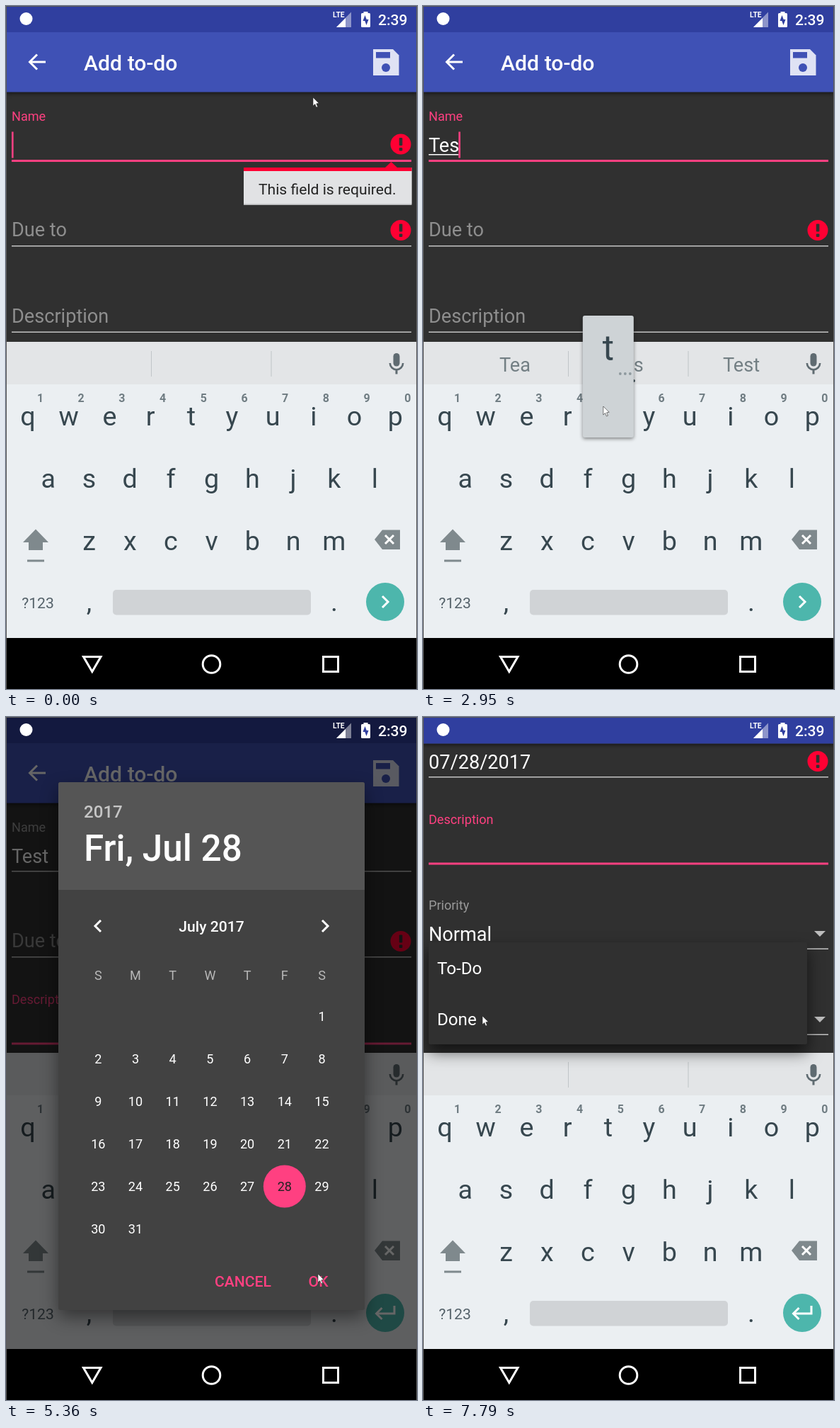
Write an HTML page with a canvas that moves like this. It is 581 by 964 pixels and loops after 8 s.

```html
<!DOCTYPE html>
<html>
<head>
<meta charset="utf-8">
<title>Add to-do</title>
<style>
html, body { margin: 0; width: 100%; height: 100%; overflow: hidden; background: #000; }
canvas { display: block; }
</style>
</head>
<body>
<canvas id="stage" width="581" height="964"></canvas>
<script>
const c = document.getElementById('stage').getContext('2d');
const LOOP = 8000, HOLD = 150, SP = 1.508;
const PINK = '#ff4081', RED = '#ff0033', DARK = '#303030', BLUE = '#3f51b5', NAVY = '#303f9f';
const TEAL = '#4db6ac', INK = '#37474f', GRAY = '#7f898d', HINT = '#8e8e8e', LABEL = '#9a9a9a';

const ROWS = ['qwertyuiop', 'asdfghjkl', 'zxcvbnm'];
const INDENT = [0, .5, 1.5];
const TAPS = [
  { key: 'T', at: 1750, words: ['The', 'T', 'This'] },
  { key: 'e', at: 2280, words: ['Tea', 'Te', 'Ten'] },
  { key: 's', at: 2580, words: ['Tea', 'Tes', 'Test'] },
  { key: 't', at: 2920, words: ['Tests', 'Test', 'Testing'] }
];
const SHIFT = 1200, NEXT = 3500, OPEN = 4130, CLOSE = 5500, SCROLL = 5810, DROP = 7340;

const keyPos = (r, i) => [31 + 57.7 * (i + INDENT[r]), 578 + 88 * r];
function findKey(key) {
  const k = key.toLowerCase(), r = ROWS.findIndex(row => row.includes(k));
  return keyPos(r, ROWS[r].indexOf(k));
}
// The pointer reaches each stop at its time and rests there for HOLD
const STOPS = [
  [0, 434, 129], [1130, 44, 750], [1450, 97, 706],
  ...TAPS.map(({ key, at }) => {
    const [x, y] = findKey(key);
    return [at, x - 7, y - 13];
  }),
  [3400, 534, 835], [3880, 151, 321], [4280, 151, 321], [5360, 441, 786],
  [5660, 235, 389], [6330, 235, 150], [7210, 100, 424], [7700, 84, 422]
];

const ramp = (t, a, b) => Math.max(0, Math.min(1, (t - a) / (b - a)));

function box(x, y, w, h, color, r = 0) {
  c.fillStyle = color;
  c.beginPath();
  c.roundRect(x, y, w, h, r);
  c.fill();
}
function disc(x, y, r, color) {
  c.fillStyle = color;
  c.beginPath();
  c.arc(x, y, r, 0, 7);
  c.fill();
}
function trace(pts) {
  c.beginPath();
  for (let i = 0; i < pts.length; i += 2) c.lineTo(pts[i], pts[i + 1]);
}
function poly(color, ...pts) {
  c.fillStyle = color;
  trace(pts);
  c.fill();
}
function line(color, ...pts) {
  c.strokeStyle = color;
  c.lineWidth = 3;
  trace(pts);
  c.stroke();
}
// Isosceles triangle: centre x, base y, half width, height (negative points up)
const tri = (color, x, y, w, h) => poly(color, x - w, y, x + w, y, x, y + h);
// Angle bracket with its tip at x, y; dir 1 points right
const chevron = (x, y, dir, s = 8) => line('#fff', x - dir * s, y - s, x, y, x - dir * s, y + s);
const dots = (x, y, gap, color) => [-gap, 0, gap].forEach(d => disc(x + d, y, 1.9, color));

function text(s, x, y, sp, color, align = 'left', weight = 400) {
  c.font = `${weight} ${sp * SP}px Roboto, sans-serif`;
  c.textAlign = align;
  c.fillStyle = color;
  c.fillText(s, x, y);
  return c.measureText(s).width;
}
function shadowBox(blur, dy, alpha, ...args) {
  c.save();
  c.shadowColor = `rgba(0,0,0,${alpha})`;
  c.shadowBlur = blur;
  c.shadowOffsetY = dy;
  box(...args);
  c.restore();
}
function fade(alpha, draw) {
  if (alpha <= 0) return;
  c.globalAlpha = alpha;
  draw();
  c.globalAlpha = 1;
}

function alertIcon(y) {
  disc(558, y, 14.5, RED);
  box(555.8, y - 9, 4.6, 11, DARK, 1);
  box(555.8, y + 5, 4.6, 4.6, DARK, 1);
}
// A form row; y is its underline. An empty, unfocused row shows its label as hint.
function field(y, label, value, focused, caret) {
  if (value || focused) text(label, 8, y - 55.5, 12, focused ? PINK : LABEL);
  else text(label, 8, y - 13.5, 18, HINT);
  const w = text(value, 8, y - 11.5, 18, '#fff');
  if (value && focused) box(8, y - 8.5, w - 1, 1.5, '#fff');
  if (focused) box(8, y - .5, 565, 3, PINK);
  else box(8, y - .5, 565, 1.5, '#c4c4c4');
  if (focused && caret) box(8 + Math.max(0, w - 1), y - 40, 2.6, 37, PINK);
}
function spinner(y, label, value) {
  field(y, label, value);
  tri('#bdbdbd', 561, y - 25, 8, 8);
}

function form(t, typed, scroll) {
  const onName = t < NEXT;
  const typing = typed && onName;
  const visible = (t < OPEN || t > CLOSE) && t < DROP;
  const caret = visible && (typing || (t + 200) % 1000 < 500);
  c.save();
  c.beginPath();
  c.rect(0, 37, 581, 437);
  c.clip();
  box(0, 37, 581, 437, DARK);
  c.translate(0, -scroll);

  field(217.5, 'Name', typed, onName, caret);
  field(338.5, 'Due to', t < CLOSE ? '' : '07/28/2017');
  field(460, 'Description', '', !onName, caret);
  spinner(581, 'Priority', 'Normal');
  spinner(702, 'State', 'To-Do');
  alertIcon(316.5);
  if (!typed) {
    alertIcon(195);
    tri(RED, 544.5, 229, 9.5, -9);
    box(336, 233, 237.5, 48, '#b4b5b7');
    box(336, 228, 237.5, 51.5, '#e1e2e4');
    box(336, 228, 237.5, 5, RED);
    text('This field is required.', 357, 266, 14, '#222');
  }
  c.restore();
}

function toolbar(scroll) {
  c.save();
  c.translate(0, -Math.min(84, scroll));
  shadowBox(5, 2, .5, 0, 37, 581, 84.5, BLUE);
  chevron(33.5, 79, -1, 10.5);
  line('#fff', 34, 79, 56, 79);
  text('Add to-do', 110, 91, 20, '#fff', 'left', 500);
  poly('#dfe2f4', 519, 61, 547, 61, 555.5, 69.5, 555.5, 98, 519, 98);
  box(523, 65, 20, 8.5, BLUE);
  disc(537, 87, 6, BLUE);
  c.restore();
  box(0, 0, 581, 37, NAVY);
}

function statusIcons() {
  disc(28.5, 18, 9, '#fff');
  text('LTE', 462, 16, 6.8, '#fff', 'left', 700);
  poly('rgba(255,255,255,.45)', 467, 30, 488, 30, 488, 8.5);
  poly('#fff', 467, 30, 480, 30, 480, 17);
  box(502, 10, 13, 20, '#fff', 1.5);
  box(505.5, 8, 6, 3, '#fff');
  tri(NAVY, 507.5, 21, 3, -8);
  tri(NAVY, 509.5, 19, 3, 8);
  text('2:39', 526, 27, 14, '#fff', 'left', 500);
}

function mic() {
  box(547.5, 490, 9, 18.5, '#5f6b71', 4.5);
  c.strokeStyle = '#5f6b71';
  c.lineWidth = 2.6;
  c.beginPath();
  c.arc(552, 504, 9.2, 0, Math.PI);
  c.stroke();
  box(550.5, 513, 3, 6.5, '#5f6b71');
}

function keyboard(t, words) {
  const upper = t >= SHIFT && t < TAPS[0].at + HOLD;
  box(0, 474, 581, 60, '#e3e5e7');
  box(0, 534, 581, 358, '#ebeff2');
  for (const x of [205, 374.5]) box(x, 487, 1, 36, '#c0c5c8');
  mic();
  words.forEach((w, i) => text(w, 130 + 160 * i, 515.5, 18, '#737f84', 'center'));
  if (words.length) dots(290, 529, 8, INK);

  ROWS.forEach((row, r) => [...row].forEach((k, i) => {
    const [x, y] = keyPos(r, i);
    text(upper ? k.toUpperCase() : k, x, y + 13.5, 25, INK, 'center');
    if (r === 0) text((i + 1) % 10, x + 17.5, y - 19, 10.6, '#6f7c82', 'center', 700);
  }));

  const shift = upper ? TEAL : GRAY;
  tri(shift, 42, 757, 18, -18.5);
  box(32, 756, 20, 12, shift);
  box(30, 781.5, 24, 3, GRAY);
  poly(GRAY, 521, 753, 532, 739.5, 557, 739.5, 557, 767, 532, 767);
  line('#fff', 536, 747, 548, 759);
  line('#fff', 548, 747, 536, 759);

  text('?123', 45, 849.5, 14, '#55626a', 'center');
  text(',', 117.5, 854, 25, INK, 'center');
  text('.', 464, 854, 25, INK, 'center');
  box(151, 824, 280, 35.5, '#d0d3d6', 5);
  disc(536, 841, 27, TEAL);
  if (t < NEXT) chevron(540, 841, 1);
  else {
    chevron(523.5, 842, -1);
    line('#fff', 549, 831, 549, 842, 524, 842);
  }
}

function keyPopup({ key }) {
  const [x, y] = findKey(key);
  shadowBox(5, 2, .45, x - 36, y - 141, 72, 172, '#ced3d6', 3);
  text(key, x, y - 78, 33, INK, 'center');
  dots(x + 24, y - 59, 7, '#8e999e');
}

function navBar() {
  box(0, 892, 581, 72, '#000');
  line('#fff', 121.8, 918.5, 134, 918.5, 121.8, 939.5, 109.5, 918.5, 121.8, 918.5);
  c.beginPath();
  c.arc(290.5, 929, 12.3, 0, 7);
  c.stroke();
  c.strokeRect(448.5, 918.5, 21, 21);
}

function picker(t) {
  shadowBox(24, 10, .45, 74, 92, 433, 745, '#424242', 3);
  box(74, 92, 433, 152, '#555', [3, 3, 0, 0]);
  text('2017', 110, 142, 16, '#c6c6c6', 'left', 500);
  text('Fri, Jul 28', 110, 203, 34, '#fff', 'left', 500);
  text('CANCEL', 335, 804, 14, PINK, 'center', 500);
  text('OK', 441.5, 804, 14, PINK, 'center', 500);
  if (t < OPEN + 280) return;
  chevron(126, 295, -1);
  chevron(455, 295, 1);
  text('July 2017', 290.5, 303, 14, '#fff', 'center', 500);
  const colX = i => 130.3 + 52.7 * i;
  [...'SMTWTFS'].forEach((d, i) => text(d, colX(i), 371, 12, '#b8b8b8', 'center'));
  disc(colX(5), 662.5, 30, PINK);
  for (let d = 1; d <= 31; d++) {
    const n = d + 5;
    text(d, colX(n % 7), 428.5 + 60.1 * Math.floor(n / 7), 12, d === 28 ? '#222' : '#fff', 'center');
  }
}

function dropdown() {
  shadowBox(22, 11, .6, 8, 318, 535, 144, DARK, 2);
  text('To-Do', 20, 362.5, 16, '#fff');
  text('Done', 20, 435, 16, '#fff');
}

function pointer(t) {
  const i = STOPS.findLastIndex(s => s[0] <= t);
  const [a, ax, ay] = STOPS[i], [b, bx, by] = STOPS[i + 1] || [LOOP, ax, ay];
  const u = ramp(t, a + HOLD, b);
  c.save();
  c.translate(ax + (bx - ax) * u, ay + (by - ay) * u);
  poly('#fff', 0, 0, 0, 12, 2.8, 9.5, 4.6, 14, 6.6, 13.2, 4.8, 8.8, 8.3, 8.3);
  c.closePath();
  c.strokeStyle = 'rgba(40,40,40,.75)';
  c.lineWidth = .8;
  c.stroke();
  c.restore();
}

function render(t) {
  const done = TAPS.filter(k => k.at + HOLD <= t);
  const typed = done.map(k => k.key).join('');
  const words = typed && t < NEXT ? done.at(-1).words : [];
  const u = ramp(t, SCROLL, SCROLL + 520);
  const scroll = 254 * (1 - (1 - u) ** 2);
  const closing = 1 - ramp(t, CLOSE, CLOSE + 140);

  form(t, typed, scroll);
  toolbar(scroll);
  keyboard(t, words);
  TAPS.filter(k => k.key !== 's' && k.at <= t && t < k.at + HOLD).forEach(keyPopup);

  fade(.6 * ramp(t, OPEN, OPEN + 180) * closing, () => box(0, 0, 581, 892, '#000'));
  statusIcons();
  navBar();
  fade(ramp(t, OPEN, OPEN + 120) * closing, () => picker(t));
  fade(ramp(t, DROP, DROP + 160), dropdown);

  pointer(t);
  c.strokeStyle = '#5a5a5a';
  c.lineWidth = 1;
  c.strokeRect(.5, .5, 580, 970);
}

const start = performance.now();
function tick() {
  render((performance.now() - start) % LOOP);
  requestAnimationFrame(tick);
}
tick();
</script>
</body>
</html>
```
